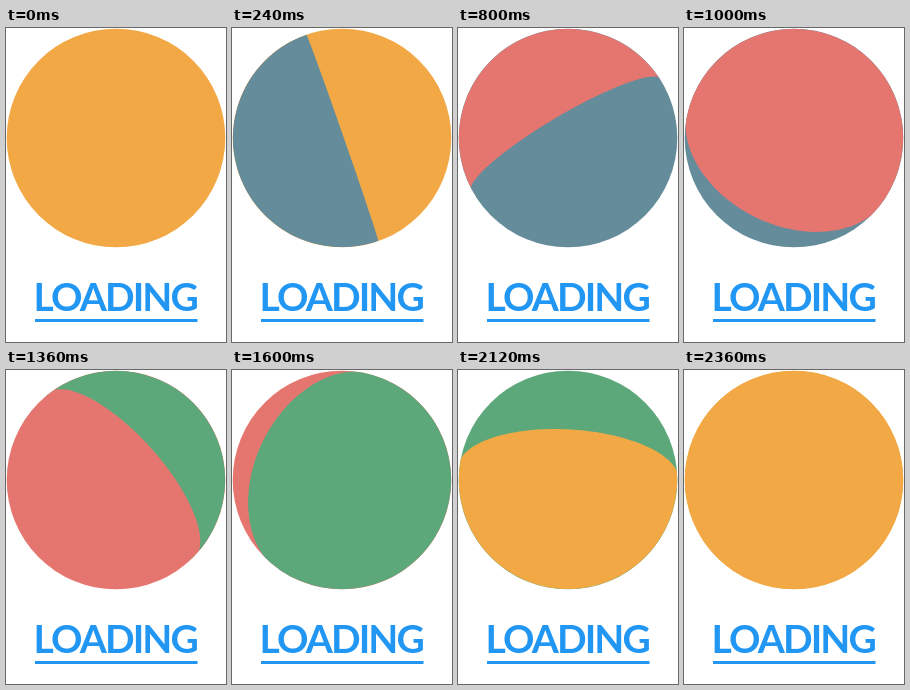
Write an HTML page that moves like this. It is 220x314 px and loops after 2400 ms.

```html
<!DOCTYPE html>
<html lang="en">
<head>
<meta charset="utf-8">
<title>Loading</title>
<style>
  html, body { margin: 0; width: 100%; height: 100%; overflow: hidden; background: #fff; }
  svg { display: block; }
  text { font: bold 39px Lato, "Open Sans", sans-serif; letter-spacing: -1.9px; }
</style>
</head>
<body>
<svg width="220" height="314" viewBox="0 0 220 314">
  <clipPath id="disc"><circle r="109.3"/></clipPath>
  <g transform="translate(110 110)">
    <circle id="back" r="109.3"/>
    <g clip-path="url(#disc)"><path id="cover"/></g>
  </g>
  <g fill="#2196f3">
    <text x="27.6" y="283.3">LOADING</text>
    <rect x="29" y="291" width="162.5" height="3"/>
  </g>
</svg>
<script>
const COLORS = ['#f2a945', '#658c9b', '#e5766f', '#5da87b'];
const R = 109.3, STEP = 40, STEPS = 15;
const DEPTH = 0.155; // radius divided by viewing distance
const back = document.getElementById('back');
const cover = document.getElementById('cover');

// Rim of a half disc folded towards the viewer, seen in perspective.
function flapRim(fold) {
  let path = '';
  for (let i = 0; i <= 60; i++) {
    const a = Math.PI * i / 60;
    const r = R / (1 - DEPTH * Math.sin(a) * Math.sin(fold));
    path += `L${r * Math.cos(a)} ${-r * Math.sin(a) * Math.cos(fold)}`;
  }
  return path;
}

function draw(now) {
  const tick = Math.floor(now / STEP + 0.01) % (STEPS * COLORS.length);
  const phase = Math.floor(tick / STEPS), k = tick % STEPS;
  const next = COLORS[(phase + 1) % COLORS.length];
  const spin = 3 + 11.3 * k;
  const fold = Math.min(spin + 20, 180) * Math.PI / 180;

  back.setAttribute('fill', k === STEPS - 1 ? next : COLORS[phase]);
  cover.setAttribute('fill', k ? next : 'none');
  cover.setAttribute('transform', `rotate(${spin + 90 * (phase - 2)})`);
  cover.setAttribute('d', `M${-R} 0A${R} ${R} 0 0 1 ${R} 0${flapRim(fold)}Z`);
}

const start = performance.now();
function loop() {
  draw(performance.now() - start);
  requestAnimationFrame(loop);
}
loop();
</script>
</body>
</html>
```
